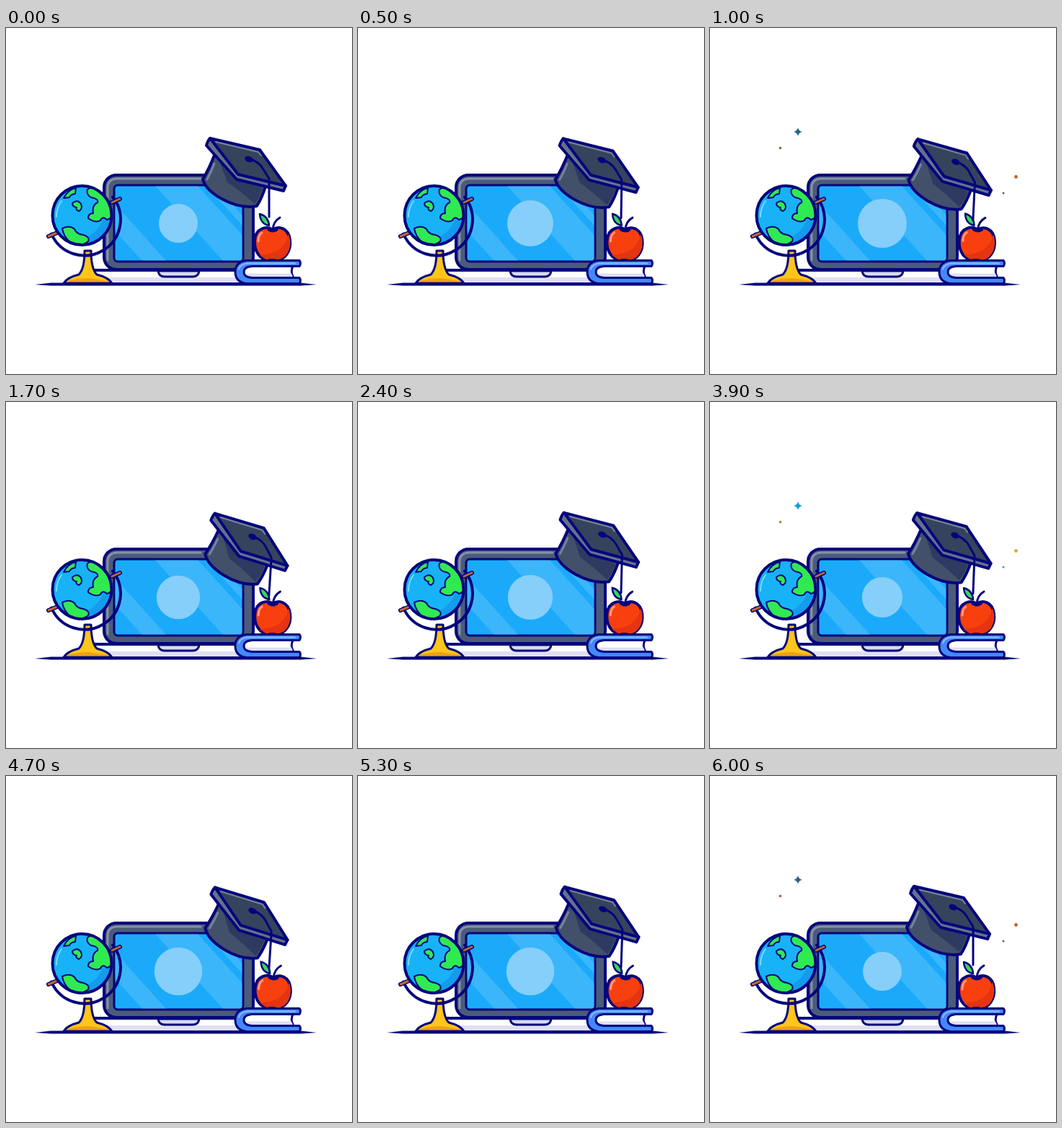
These frames come from a looping animation (480x480 px, 6.1 s). An HTML page:

```html
<!DOCTYPE html>
<html lang="en">
<head>
<meta charset="utf-8">
<title>Study desk</title>
<style>
  html, body { margin: 0; width: 100%; height: 100%; overflow: hidden; background: #fff; }
  svg { display: block; width: 100vw; height: 100vh; }
  .ink { stroke: #05057c; stroke-width: 4; stroke-linejoin: round; stroke-linecap: round; }
  .line { fill: none; }
  .thin { stroke-width: 3; }
  .shine { fill: none; stroke-linecap: round; stroke-linejoin: round; }
</style>
</head>
<body>
<svg viewBox="0 0 480 480">
  <defs>
    <clipPath id="screenClip"><rect x="151" y="219" width="177" height="104" rx="4"/></clipPath>
    <clipPath id="globeClip"><circle cx="105.500" cy="260" r="40"/></clipPath>
    <clipPath id="appleClip"><path id="appleShape" d="M370 280C362 274 346 277 345 295C344 311 354 322 363 321Q369 319 376 321C386 322 396 310 394 294C392 277 378 274 370 280Z"/></clipPath>
  </defs>

  <path fill="#05057c" d="M40 356L62 353.500H409L431 356L409 357.500H62Z"/>

  <g id="laptop">
    <path class="ink" fill="#fff" d="M120 336H332V355H140Q124 353 120 336Z"/>
    <path fill="#e0e0f3" d="M126 346H330V353H141Q131 352 126 346Z"/>
    <path class="ink thin" fill="#d8daf0" d="M211 337Q212 345 220 345H259Q267 345 268 337Z"/>
    <rect class="ink" x="136" y="204" width="207" height="131" rx="17" fill="#4a5c78"/>
    <path class="shine" stroke="#8790aa" stroke-width="3" d="M141 322V222Q141 209 155 209H270"/>
    <rect class="ink thin" x="150" y="218" width="179" height="106" rx="5" fill="#1baafa"/>
    <g clip-path="url(#screenClip)" fill="#fff" fill-opacity=".14">
      <path d="M206 218H265L361 324H302Z"/>
      <path d="M277 218H290L386 324H373Z"/>
      <path d="M150 243L223 324H190L150 280Z"/>
    </g>
    <circle id="badge" cx="239" cy="271" r="27" fill="#86cffa"/>
  </g>

  <g id="globe">
    <path class="ink thin" fill="#ffc51b" d="M109 309H118Q118 334 126 342Q142 346 147 354H80Q85 346 101 342Q109 334 109 309Z"/>
    <path fill="#eca313" d="M84 352Q94 348 110 347Q122 347 143 352Z"/>
    <path class="ink line" d="M63 285.500A50 50 0 1 0 148 234.500"/>
    <g stroke-linecap="round">
      <path class="ink" style="stroke-width:6" d="M59 289L71 284M147 242L158 237"/>
      <path stroke="#bd6835" stroke-width="3" d="M59 289L71 284M147 242L158 237"/>
    </g>
    <circle cx="105.500" cy="260" r="41" fill="#18b2f7"/>
    <g clip-path="url(#globeClip)">
      <path fill="#149bed" d="M134 219Q146 270 116 288Q93 300 69 286L77 310H151V224Z"/>
      <g class="ink" style="stroke-width:2" fill="#30ea52">
        <path d="M80 236Q86 224 97 222L96 230Q89 231 88 235Z"/>
        <path d="M92 243Q99 237 104 244Q107 251 101 254Q96 252 98 249Q92 248 92 243Z"/>
        <path d="M113 224Q120 218 130 224Q144 234 148 254Q148 264 140 266Q134 260 131 267Q124 271 114 264Q114 257 121 257Q119 246 127 242Q129 237 118 235Q111 231 113 224Z"/>
        <path d="M78 278Q89 273 95 279Q98 286 107 287Q117 290 114 296Q102 305 89 297Q80 290 78 278Z"/>
      </g>
    </g>
    <circle class="ink line" cx="105.500" cy="260" r="41"/>
    <path class="shine" stroke="#7fdcfd" stroke-width="2" d="M70 262Q70 249 77 240"/>
  </g>

  <g id="cap">
    <path class="ink" fill="#42506a" d="M290 174Q282 195 273 210Q277 225 301 238Q326 251 348 247Q355 236 360 220L323 204Z"/>
    <path fill="#2e3a60" d="M297 187L322 211L356 222Q351 237 345 244Q326 227 307 214Z"/>
    <path class="shine" stroke="#77839a" stroke-width="3" d="M289 188Q284 201 279 210"/>
    <path class="ink" fill="#65728c" d="M283 153Q280 156 278 163L320 210L385 226L388 219Z"/>
    <path class="ink" fill="#36435d" d="M283 153L352 169L388 219L322 203Z"/>
    <path class="shine" stroke="#78849b" stroke-width="2" d="M291 158L350 172L354 177"/>
    <path class="ink line thin" d="M336 181Q351 185 357 196L365 209V262"/>
    <ellipse cx="337" cy="182" rx="6" ry="4" fill="#05057c" transform="rotate(20 337 182)"/>
  </g>

  <g id="book" transform="translate(0 -.5)">
    <path class="ink thin" fill="#fff" d="M339 331H398Q394 339 399 347H339Q329 346 329 339Q329 332 339 331Z"/>
    <path fill="#dddff3" d="M334 341H396L398 346H339Q334 345 334 341Z"/>
    <path class="ink thin" fill="#4388fa" d="M407 323H334Q318 325 318 339Q318 353 334 355H407Q410 351 407 347H341Q330 346 330 339Q330 332 341 331H407Q410 327 407 323Z"/>
    <path class="shine" stroke="#8bbcff" stroke-width="2" d="M323 335Q325 328 335 327H401"/>
  </g>

  <g id="apple">
    <use href="#appleShape" class="ink" fill="#f8400f"/>
    <path clip-path="url(#appleClip)" fill="#e5340f" d="M392 284Q388 313 352 315L363 323H398V284Z"/>
    <path class="shine" stroke="#ff9a80" stroke-width="3" d="M350 296Q350 287 355 284"/>
    <path class="ink line thin" d="M364 280Q370 284 376 280M370 280Q371 268 380 263"/>
    <path class="ink" style="stroke-width:2.500" fill="#35d95c" d="M352 258Q364 261 365 274Q353 272 352 258Z"/>
  </g>

  <g id="stars">
    <path d="M122 138Q123 143 128 144Q123 145 122 150Q121 145 116 144Q121 143 122 138Z"/>
    <circle cx="97.500" cy="166.500" r="1.800"/>
    <circle cx="424.500" cy="206.500" r="2.400"/>
    <circle cx="407" cy="229" r="1.500"/>
  </g>
</svg>
<script>
  const LOOP = 6100, STEP = 100;
  const $ = id => document.getElementById(id);
  const badge = $('badge'), cap = $('cap'), apple = $('apple'), stars = $('stars');
  const glow = {
    dim: ['#2b5f86', '#95603b', '#bd622b', '#506674'],
    bright: ['#159bdc', '#bd7930', '#e7a31f', '#249fce']
  };

  // Smooth swing from 0 to 1 and back.
  const swing = (t, period) => (1 - Math.cos(2 * Math.PI * t / period)) / 2;

  // Quick rise, soft top, quick fall.
  const pulse = (t, period) => Math.abs(Math.sin(Math.PI * t / period));

  function draw(t) {
    badge.setAttribute('r', 27 + 7 * pulse(t, 2000));
    cap.setAttribute('transform', `rotate(${3.8 * swing(t, LOOP / 2)} 262 262)`);
    apple.setAttribute('transform', `rotate(${1.8 * swing(t, 2000)} 369 322)`);

    // Short twinkle at the end of every second.
    const phase = t % 1000;
    const lit = t >= 800 && (phase >= 800 || phase < 100);
    stars.setAttribute('visibility', lit ? 'visible' : 'hidden');
    const tones = phase === 900 ? glow.bright : glow.dim;
    [...stars.children].forEach((s, i) => s.setAttribute('fill', tones[i]));
  }

  const start = performance.now();
  function tick() {
    const t = (performance.now() - start) % LOOP;
    draw(Math.floor(t / STEP) * STEP);
    requestAnimationFrame(tick);
  }
  draw(0);
  requestAnimationFrame(tick);
</script>
</body>
</html>
```
